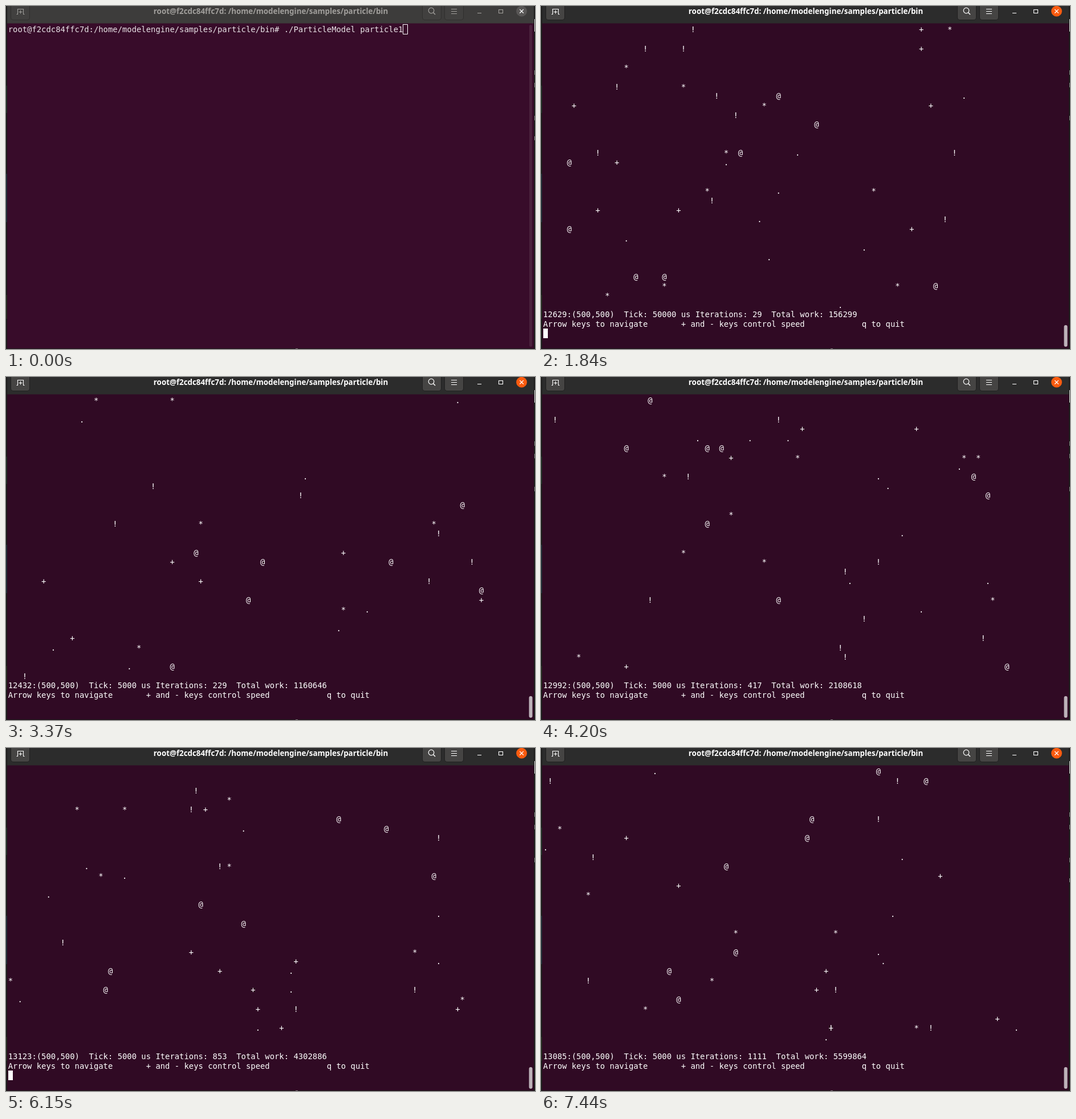
Animation of 928x603 px, one loop 7540 ms. Source, as an HTML page with a canvas:

```html
<!DOCTYPE html>
<html lang="en">
<head>
<meta charset="utf-8">
<title>Particle terminal</title>
<style>
html, body { margin: 0; width: 100%; height: 100%; overflow: hidden; background: #1b1b1a; }
canvas { display: block; }
</style>
</head>
<body>
<canvas id="stage" width="928" height="603"></canvas>
<script>
const ctx = document.getElementById('stage').getContext('2d');
const LOOP = 7540, STEP = 61, FOCUS = 60, START = 557, SPEEDUP = 2557;
const COLS = 100, ROWS = 30, CELL_W = 8.345, CELL_H = 16.7, LEFT = 3.7, TOP = 33.3;
const MONO = '13.87px "DejaVu Sans Mono", monospace';
const SANS = 'bold 13.35px "Noto Sans", "Open Sans", sans-serif';
const COMMAND = 'root@f2cdc84ffc7d:/home/modelengine/samples/particle/bin# ./ParticleModel particle1';
const TITLE = 'root@f2cdc84ffc7d: /home/modelengine/samples/particle/bin';
const HELP = 'Arrow keys to navigate' + ' '.repeat(7) + '+ and - keys control speed' + ' '.repeat(12) + 'q to quit';

// Key points of the status line: time, iterations, total work, leading counter
const STATUS = [
  [START, 0, 0, 12700],
  [1840, 29, 156299, 12629],
  [SPEEDUP, 45, 236600, 12540],
  [3370, 229, 1160646, 12432],
  [4200, 417, 2108618, 12992],
  [5220, 648, 3267330, 13640],
  [6150, 853, 4302886, 13123],
  [7440, 1111, 5599864, 13085]
];
const HOLDS = [0, FOCUS, ...STATUS.map(s => s[0]), LOOP];

const rand = n => { const s = Math.sin(n * 127.1 + 11.7) * 43758.5453; return s - Math.floor(s); };
const mod = (a, n) => ((a % n) + n) % n;
const mix = (a, b, k) => a + (b - a) * k;
const clamp = v => Math.max(0, Math.min(1, v));
const shade = (a, b, k) => `rgb(${a.map((v, i) => Math.round(mix(v, b[i], k))).join()})`;

// Particles drift through a world a little larger than the visible grid.
const WORLD_W = COLS + 12, WORLD_H = ROWS + 4;
const swarm = Array.from({ length: 48 }, (_, i) => {
  const angle = rand(i + 200) * Math.PI * 2, speed = 0.3 + 0.7 * rand(i + 300);
  return {
    glyph: '!*.+@'[i % 5],
    x: rand(i) * WORLD_W,
    y: rand(i + 100) * WORLD_H,
    vx: Math.cos(angle) * speed,
    vy: Math.sin(angle) * speed
  };
});

// The picture refreshes about every 61 ms.
function snap(t) {
  const i = HOLDS.findIndex(h => h > t) - 1;
  const a = HOLDS[i], len = HOLDS[i + 1] - a;
  if (len <= 100) return a;
  const step = len / Math.round(len / STEP);
  return a + Math.floor((t - a) / step) * step;
}

function status(t) {
  let i = 0;
  while (i < STATUS.length - 2 && t >= STATUS[i + 1][0]) i++;
  const p = STATUS[i], q = STATUS[i + 1], k = clamp((t - p[0]) / (q[0] - p[0]));
  const iter = Math.floor(mix(p[1], q[1], k));
  const work = Math.round(mix(p[2], q[2], (iter - p[1]) / (q[1] - p[1])));
  const jitter = k % 1 ? (rand(iter) - 0.5) * 500 : 0;
  return { iter, work, count: Math.round(mix(p[3], q[3], k) + jitter) };
}

function rect(color, x, y, w, h) {
  ctx.fillStyle = color;
  ctx.fillRect(x, y, w, h);
}

function pill(color, x, y, w, h, r) {
  ctx.fillStyle = color;
  ctx.beginPath();
  ctx.roundRect(x, y, w, h, r);
  ctx.fill();
}

function line(color, width, ...runs) {
  ctx.strokeStyle = color;
  ctx.lineWidth = width;
  ctx.beginPath();
  for (const run of runs) run.forEach(([x, y], i) => i ? ctx.lineTo(x, y) : ctx.moveTo(x, y));
  ctx.stroke();
}

function circle(x, y, r) {
  ctx.beginPath();
  ctx.arc(x, y, r, 0, Math.PI * 2);
}

function type(text, col, row) {
  for (let i = 0; i < text.length; i++) {
    if (text[i] !== ' ') ctx.fillText(text[i], LEFT + (col + i) * CELL_W, TOP + row * CELL_H + 13);
  }
}

function drawDesktop(t) {
  rect('#1b1b1a', 0, 0, 928, 603);
  rect('#202e25', 0, 140, 2, 48);
  rect('#202d36', 0, 295, 2, 85);
  rect('#242b20', 0, 508, 2, 42);
  rect('#e8e8e8', 927, 23, 1, 22);
  for (const y of [113, 135, 193]) rect('#888', 927, y, 1, 8);
  if (t < 1000 || t > 6800) rect('#999', 927, 229, 1, 7);
  rect('#777', 508, 602, 4, 1);
}

function drawHeader(focus) {
  const ink = shade([160, 158, 155], [255, 255, 255], focus);
  const face = shade([65, 64, 63], [69, 68, 67], focus);
  const edge = shade([48, 47, 46], [32, 32, 32], focus);
  rect(shade([61, 60, 59], [44, 44, 44], focus), 2, 0, 924, 30);
  rect(shade([58, 36, 50], [46, 27, 40], focus), 2, 30, 924, 1);
  for (const x of [9, 731, 770]) {
    pill(edge, x - 1, -6, 34, 31, 5);
    pill(face, x, -6, 32, 30, 4);
  }

  line(ink, 1.1, [[18.5, 14.5], [20.5, 14.5], [20.5, 5.5], [30.5, 5.5], [30.5, 14.5], [32.5, 14.5]],
    [[25.5, 7.5], [25.5, 13.5]], [[22.5, 10.5], [28.5, 10.5]]);
  ctx.lineWidth = 1.2;
  circle(746, 8, 4.8);
  ctx.stroke();
  line(ink, 1.5, [[749.5, 11.5], [753, 15]]);
  line(ink, 1.1, ...[5.5, 9.5, 13.5].map(y => [[781, y], [791, y]]));
  line(ink, 1.1, [[827, 12.5], [834, 12.5]]);
  ctx.strokeRect(864.5, 6.5, 7, 6);

  ctx.fillStyle = shade([88, 86, 85], [250, 91, 15], focus);
  circle(904.5, 9.2, 9.4);
  ctx.fill();
  line('#fff', 1.3, [[901.2, 5.9], [907.8, 12.5]], [[907.8, 5.9], [901.2, 12.5]]);

  ctx.font = SANS;
  ctx.textAlign = 'center';
  ctx.fillStyle = ink;
  ctx.fillText(TITLE, 464.5, 14);
  ctx.textAlign = 'left';
}

function drawCursor(col, row, filled) {
  const x = Math.round(LEFT + col * CELL_W), y = Math.round(TOP + row * CELL_H) - 1;
  if (filled) rect('#fff', x, y, 8, 17);
  else line('#fff', 1, [[x + 0.5, y + 0.5], [x + 8.5, y + 0.5], [x + 8.5, y + 17.5], [x + 0.5, y + 17.5], [x + 0.5, y]]);
}

function drawParticles(iter) {
  for (const p of swarm) {
    const col = Math.floor(mod(p.x + p.vx * iter, WORLD_W));
    const row = Math.floor(mod(p.y + p.vy * iter, WORLD_H));
    if (col < COLS && row < ROWS) type(p.glyph, col, row);
  }
}

function draw(t) {
  const focused = t >= FOCUS;
  const focus = focused ? clamp((t - 30) / 200) : 0;
  const blink = mod(t - 380, 1062) < 531;

  drawDesktop(t);
  drawHeader(focus);
  rect(shade([56, 12, 42], [48, 10, 36], focus), 2, 31, 924, 571);

  ctx.font = MONO;
  ctx.fillStyle = shade([232, 226, 230], [255, 255, 255], focus);
  if (t < START) {
    type(COMMAND, 0, 0);
    if (!focused || blink) drawCursor(COMMAND.length, 0, focused);
    pill('rgba(255,255,255,0.09)', 918, 33, 5, 566, 2.5);
    return;
  }

  const { iter, work, count } = status(t);
  const tick = t < SPEEDUP ? 50000 : 5000;
  drawParticles(iter);
  type(`${count}:(500,500)  Tick: ${tick} us Iterations: ${iter}  Total work: ${work}`, 0, 30);
  type(HELP, 0, 31);
  if (blink) drawCursor(0, 32, true);
  // The scroll thumb shrinks as each redraw adds to the history.
  const thumb = Math.max(38, 566 / (iter + 1));
  pill('#bdb3ba', 917.5, 599 - thumb, 6, thumb, 3);
}

function frame() {
  draw(snap(performance.now() % LOOP));
  requestAnimationFrame(frame);
}
frame();
</script>
</body>
</html>
```
